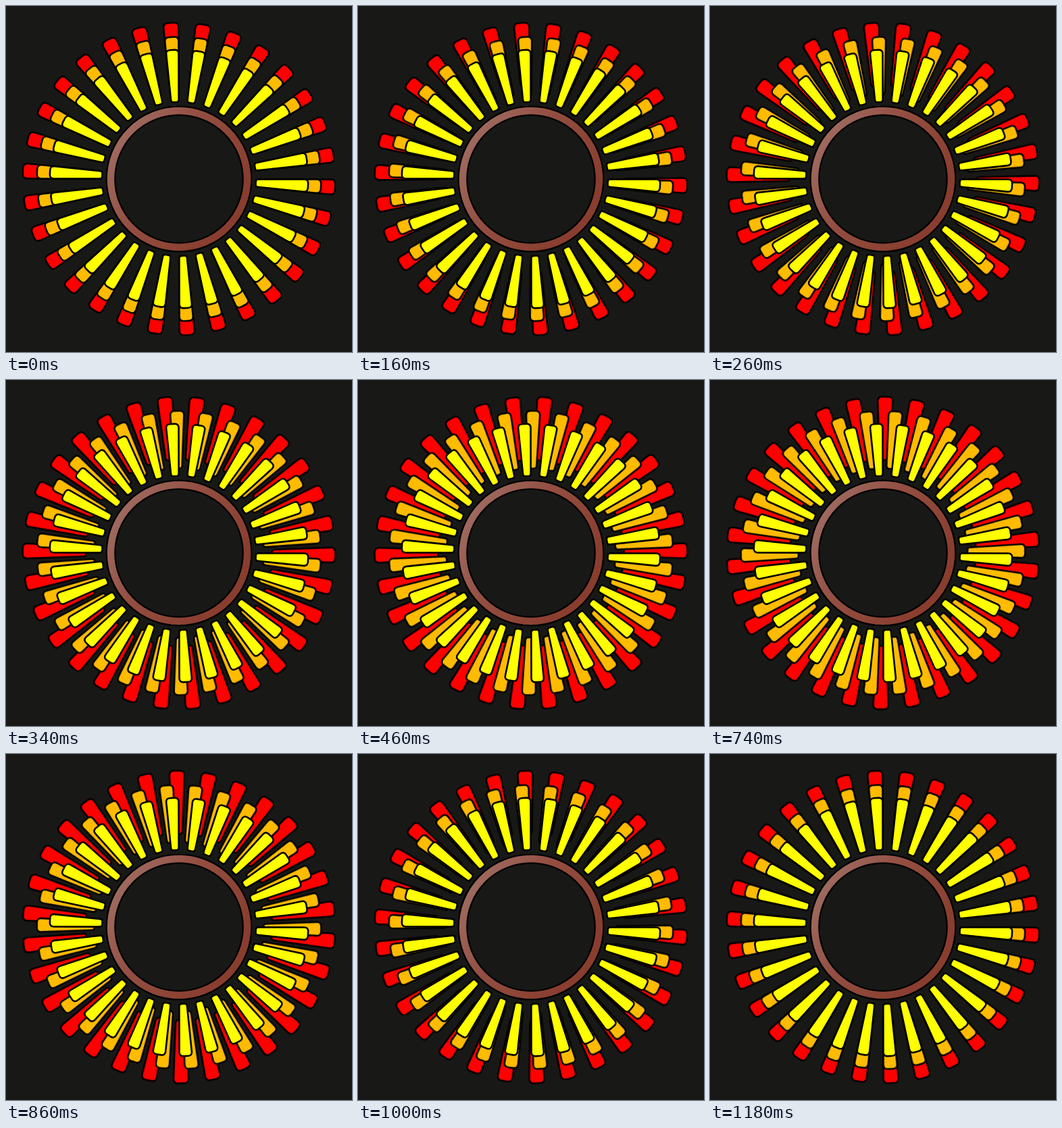
Animation of 512x512 px, one loop 1200 ms. Source, as an HTML page:

```html
<!DOCTYPE html>
<html lang="en">
<head>
<meta charset="utf-8">
<title>Petal wheel</title>
<style>
  html, body { margin: 0; width: 100%; height: 100%; overflow: hidden; background: #181816; }
  svg { display: block; width: 100vw; height: 100vh; }
  .petals { stroke: #000; stroke-width: 2.6; stroke-linejoin: round; }
  /* the bezier follows a half cosine wave */
  .turn { transform-origin: 0 0; animation: turn 1200ms cubic-bezier(.3642, 0, .6358, 1) infinite; }
  .left { --step: -12deg; }
  .right { --step: 12deg; }
  @keyframes turn {
    from { transform: rotate(0deg); }
    to { transform: rotate(var(--step)); }
  }
</style>
</head>
<body>
<svg viewBox="-256 -256 512 512">
  <defs>
    <linearGradient id="copper" gradientUnits="userSpaceOnUse" x1="-106" y1="-56" x2="74" y2="54">
      <stop offset="0" stop-color="#a06e64"/>
      <stop offset=".45" stop-color="#934e41"/>
      <stop offset="1" stop-color="#893d2e"/>
    </linearGradient>
  </defs>
  <g class="petals turn left" fill="#f00" data-scale="1.21"></g>
  <g class="petals turn right" fill="#ffbb00" data-scale="1.1"></g>
  <g class="petals" fill="#ff0" data-scale="1"></g>
  <g fill="none">
    <circle r="101" stroke="#000" stroke-width="15"/>
    <circle r="101" stroke="url(#copper)" stroke-width="10.4"/>
  </g>
</svg>
<script>
  const COUNT = 30, STEP = 360 / COUNT, OFFSET = -3;
  const INNER = 113.7, OUTER = 191.2;          // radial extent
  const INNER_W = 5.6, OUTER_W = 9.5;          // half widths
  const INNER_R = 3.4, OUTER_R = 6.2;          // corner sizes

  // Tapered bar pointing up, with rounded corners
  function petal(scale) {
    const slope = (OUTER_W - INNER_W) / (OUTER - INNER);
    const half = r => INNER_W + (r - INNER) * slope;
    const at = (x, r) => `${x * scale} ${-r * scale}`;
    const low = INNER + INNER_R, high = OUTER - OUTER_R;
    return `M${at(INNER_R - INNER_W, INNER)}
      Q${at(-INNER_W, INNER)} ${at(-half(low), low)}
      L${at(-half(high), high)}
      Q${at(-OUTER_W, OUTER)} ${at(OUTER_R - OUTER_W, OUTER)}
      L${at(OUTER_W - OUTER_R, OUTER)}
      Q${at(OUTER_W, OUTER)} ${at(half(high), high)}
      L${at(half(low), low)}
      Q${at(INNER_W, INNER)} ${at(INNER_W - INNER_R, INNER)}Z`;
  }

  for (const group of document.querySelectorAll('.petals')) {
    const d = petal(+group.dataset.scale);
    for (let i = 0; i < COUNT; i++) {
      const path = document.createElementNS('http://www.w3.org/2000/svg', 'path');
      path.setAttribute('d', d);
      path.setAttribute('transform', `rotate(${OFFSET + i * STEP})`);
      group.append(path);
    }
  }
</script>
</body>
</html>
```
